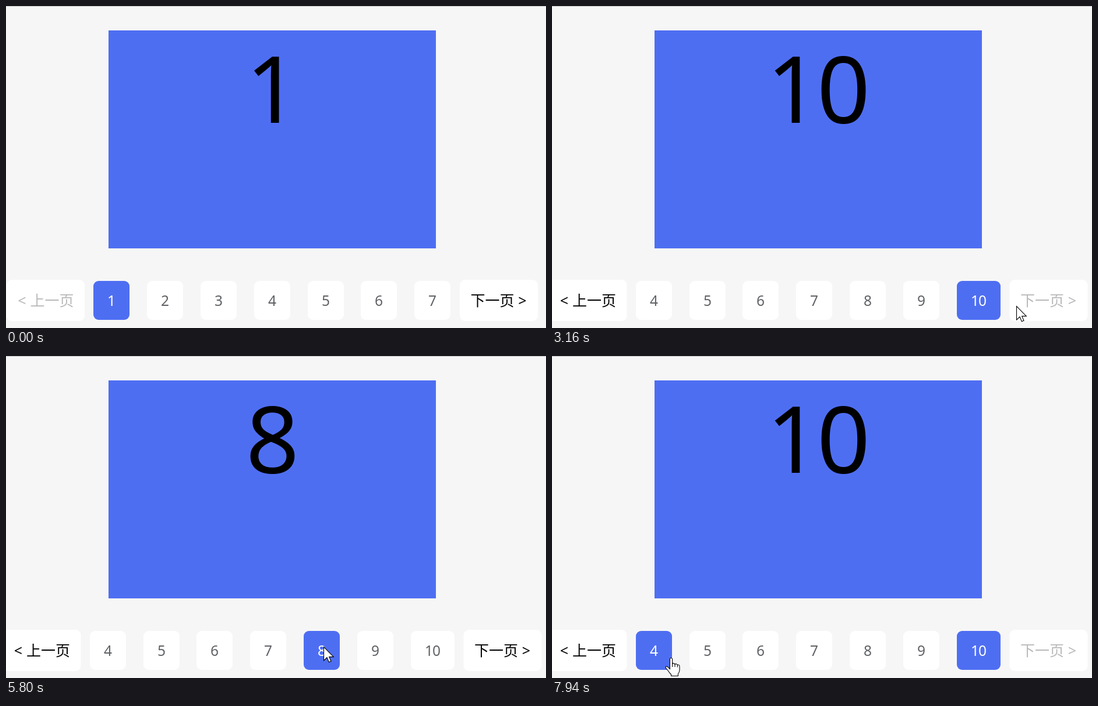
Recreate the animation shown at these times as an HTML page with a canvas. Size 927 by 554 pixels, loop 8 s.

```html
<!DOCTYPE html>
<html lang="zh-CN">
<head>
<meta charset="utf-8">
<title>分页</title>
<style>
html, body { margin: 0; width: 100%; height: 100%; overflow: hidden; background: #f6f6f6; }
canvas { display: block; }
</style>
</head>
<body>
<canvas id="stage" width="927" height="554"></canvas>
<script>
const ctx = document.getElementById('stage').getContext('2d');
const LOOP = 8000, TICK = 70, PRESS = 60, LAST_PAGE = 10;
const BLUE = '#4e6ef2', GREY = '#606266', FADED = '#b9b8bb';
const DIGITS = '"Noto Sans", "Open Sans", sans-serif';
const HAN = '"Noto Sans CJK SC", "Noto Sans CJK", "Noto Sans CJK JP", sans-serif';

// Evenly spaced clicks; each one moves a page further
const bursts = [
  { at: 780, gap: 270, count: 2, page: 2 },
  { at: 1470, gap: 202, count: 7, page: 4 },
  { at: 4050, gap: 550, count: 2, page: 5 },
  { at: 5370, gap: 330, count: 4, page: 7 }
];

// Pointer moves: start, end, x, y. It rests in between.
const moves = [
  [0, 0, 860, 560],
  [370, 580, 850, 519],
  [2830, 3090, 820, 516],
  [3090, 3650, 288, 523],
  [3910, 4050, 280, 525],
  [4130, 4400, 545, 505],
  [4740, 5090, 514, 497],
  [5090, 5230, 545, 500],
  [5780, 5930, 634, 502],
  [6140, 6490, 748, 502],
  [6490, 7040, 846, 506],
  [7040, 7460, 580, 570],
  [7590, 7590, 290, 570],
  [7590, 7870, 204, 519]
];

const arrow = new Path2D('M.5 .5V24L6 18.8L9.4 26.7L13 25.2L9.7 17.6H17.3Z');
const hand = new Path2D('M-1.6 2Q.4 -1 2.6 2V10.5Q5 8.5 7 11.3Q9.6 9.6 11.3 12.4Q14.8 11.6 15 15V21.5Q14.8 25 12.4 28V31.5H.6V29Q-3 25.5 -5 22L-8.8 17.5Q-9.3 14 -6 15.4L-1.6 19.5Z');
const fingers = new Path2D('M2.6 10V16M7 11V16M11.3 12.4V16.5');

const smooth = u => u * u * (3 - 2 * u);

function pointerAt(t) {
  let x = 0, y = 0, moving = false;
  for (const [start, end, tx, ty] of moves) {
    if (t < start) break;
    moving = t < end;
    const step = Math.floor((t - start) / TICK) * TICK;
    const k = moving ? smooth(step / (end - start)) : 1;
    x += (tx - x) * k;
    y += (ty - y) * k;
  }
  return { x: Math.round(x), y: Math.round(y), moving };
}

function clickState(t) {
  let page = 1, pressed = false;
  for (const b of bursts) {
    for (let i = 0; i < b.count; i++) {
      const dt = t - b.at - i * b.gap;
      if (dt >= PRESS) page = b.page + i;
      else if (dt >= 0) pressed = true;
    }
  }
  return { page, pressed };
}

function makeButtons(page) {
  const first = Math.max(1, Math.min(page - 3, LAST_PAGE - 6));
  const wide = first + 6 === LAST_PAGE;
  const spread = wide ? 6.5 : 0;
  const list = [
    { x: 1 - spread, y: 471, w: 134, h: 71, label: '上一页', mark: '<', textX: 40.5, markX: 26.5, off: page === 1 },
    { x: 779 + spread, y: 471, w: 134, h: 71, label: '下一页', mark: '>', textX: 18.5, markX: 107.5, off: page === LAST_PAGE }
  ];
  for (let i = 0; i < 7; i++) {
    const n = first + i;
    const x = Math.floor(150.7 - spread + 91.83 * i);
    list.push({ x, y: 473, w: n > 9 ? 75 : 62, h: 67, n, on: n === page });
  }
  return list;
}

const contains = (b, p) => p.x >= b.x && p.x < b.x + b.w && p.y >= b.y && p.y < b.y + b.h;

function drawText(s, x, y, size, family, align) {
  ctx.font = `${size}px ${family}`;
  ctx.textAlign = align;
  ctx.fillText(s, x, y);
}

function drawNumber(n, cx, base, size) {
  const digits = [...String(n)];
  digits.forEach((d, i) =>
    drawText(d, cx + (i - (digits.length - 1) / 2) * size * 0.539, base, size, DIGITS, 'center'));
}

function drawButton(b, lit) {
  ctx.fillStyle = lit ? BLUE : '#fff';
  ctx.beginPath();
  ctx.roundRect(b.x, b.y, b.w, b.h, 9);
  ctx.fill();
  ctx.fillStyle = lit ? '#fff' : b.off ? FADED : b.label ? '#000' : GREY;
  if (b.label) {
    drawText(b.label, b.x + b.textX, 516, 25, HAN, 'left');
    drawText(b.mark, b.x + b.markX, 516, 25, DIGITS, 'center');
  } else {
    drawNumber(b.n, b.x + b.w / 2, 515.5, 24.5);
  }
}

function drawPointer(p, isHand) {
  const shape = isHand ? hand : arrow;
  ctx.save();
  ctx.translate(p.x, p.y);
  ctx.fillStyle = '#fff';
  ctx.strokeStyle = '#000';
  ctx.lineWidth = 1.1;
  ctx.fill(shape);
  ctx.stroke(shape);
  if (isHand) ctx.stroke(fingers);
  ctx.restore();
}

function draw(t) {
  const { page, pressed } = clickState(t);
  const p = pointerAt(t);
  const buttons = makeButtons(page);
  const hovered = buttons.find(b => !b.on && !b.off && contains(b, p));

  ctx.fillStyle = '#f6f6f6';
  ctx.fillRect(0, 0, 927, 554);
  ctx.fillStyle = '#c3c3c3';
  ctx.fillRect(0, 0, 927, 1);
  ctx.fillStyle = BLUE;
  ctx.fillRect(176, 42, 562, 375);
  ctx.fillStyle = '#000';
  drawNumber(page, 457.5, 201, 160);

  for (const b of buttons) drawButton(b, b.on || b === hovered);
  if (pressed) {
    ctx.fillStyle = 'rgba(255, 255, 0, 0.47)';
    ctx.beginPath();
    ctx.arc(p.x, p.y, 18, 0, Math.PI * 2);
    ctx.fill();
  }
  drawPointer(p, hovered && !p.moving);
}

const start = performance.now();
function tick() {
  draw((performance.now() - start) % LOOP);
  requestAnimationFrame(tick);
}
tick();
</script>
</body>
</html>
```
